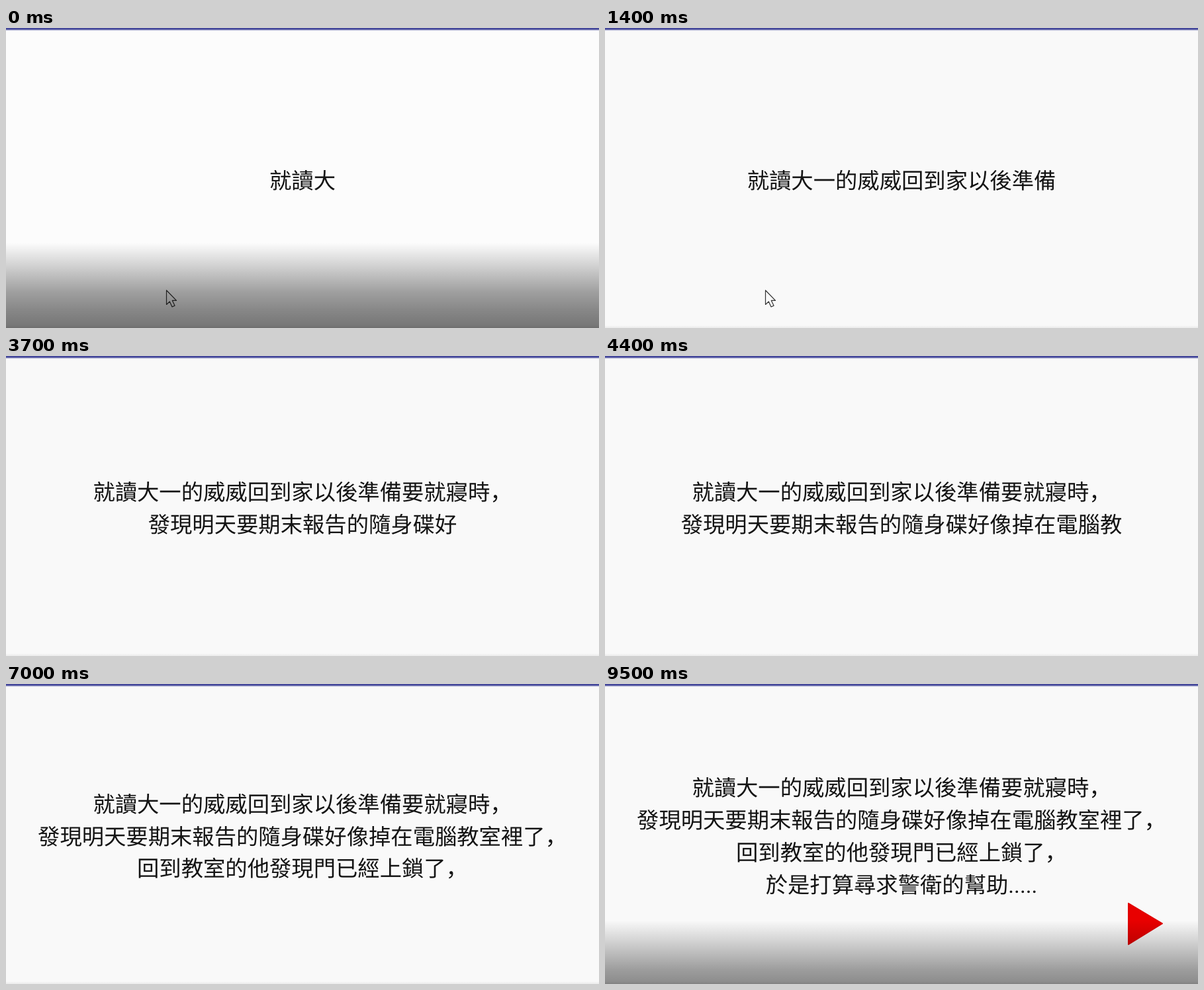
These frames come from a looping animation (896x454 px, 9600 ms). An HTML page:

```html
<!DOCTYPE html>
<html lang="zh-Hans">
<head>
<meta charset="utf-8">
<title>Typed story</title>
<style>
  html, body { margin: 0; width: 100%; height: 100%; overflow: hidden; background: #f9f9f9; }
  svg { display: block; width: 896px; height: 454px; }
  text {
    font: 400 33.35px Roboto, "Noto Sans CJK SC", "Noto Sans CJK", sans-serif;
    text-rendering: geometricPrecision;
    text-anchor: middle;
    text-spacing-trim: space-all;
    fill: #141414;
  }
</style>
</head>
<body>
<svg viewBox="0 0 896 454">
  <defs>
    <linearGradient id="bar" x2="0" y2="1">
      <stop offset="0" stop-color="#44479a"/>
      <stop offset=".4" stop-color="#44479a"/>
      <stop offset=".65" stop-color="#b9bbd8"/>
      <stop offset="1" stop-color="#f4f4f8" stop-opacity="0"/>
    </linearGradient>
    <linearGradient id="edge" x2="0" y2="1">
      <stop offset="0" stop-opacity="0"/>
      <stop offset="1" stop-opacity=".06"/>
    </linearGradient>
    <linearGradient id="dim" x2="0" y2="1">
      <stop offset="0" stop-opacity="0"/>
      <stop offset=".27" stop-opacity=".17"/>
      <stop offset=".58" stop-opacity=".37"/>
      <stop offset=".78" stop-opacity=".46"/>
      <stop offset="1" stop-opacity=".54"/>
    </linearGradient>
  </defs>
  <rect id="paper" width="896" height="454" fill="#f9f9f9"/>
  <rect width="896" height="5" fill="url(#bar)"/>
  <rect y="450" width="896" height="4" fill="url(#edge)"/>
  <g id="lines"></g>
  <path id="next" d="M791 332 842 362.5 791 394Z" fill="#e80000" stroke="#e00000" stroke-width="2" stroke-linejoin="round"/>
  <path id="pointer" d="M242.500 397v21.500l4.800-4.500 3.700 8 4-1.900-3.700-7.700h6.200Z" fill="#fafafa" stroke="#333" stroke-width="1.200" stroke-linejoin="round"/>
  <rect id="shade" y="325" width="896" height="129" fill="url(#dim)"/>
</svg>
<script>
  const LOOP = 9600, STEP = 100, PITCH = 48.8, MID = 242.6, SHADE_H = 129;
  const STORY = [
    '就讀大一的威威回到家以後準備要就寢時,',
    '發現明天要期末報告的隨身碟好像掉在電腦教室裡了,',
    '回到教室的他發現門已經上鎖了,',
    '於是打算尋求警衛的幫助.....'
  ].join('\n').replace(/,/g, '\uff0c');

  // where the typing tempo changes: [ms, characters typed]
  const TEMPO = [
    [0, 3], [1000, 10], [1400, 14], [1700, 18], [2000, 20], [2700, 27], [3000, 28],
    [4400, 40], [5800, 50], [6300, 55], [7000, 60], [8300, 71], [9100, STORY.length]
  ];

  const $ = id => document.getElementById(id);
  const show = (id, on) => $(id).setAttribute('visibility', on ? 'visible' : 'hidden');
  const rows = STORY.split('\n').map(() => {
    const row = document.createElementNS('http://www.w3.org/2000/svg', 'text');
    row.setAttribute('x', 448);
    return $('lines').appendChild(row);
  });

  function typedAt(t) {
    const i = TEMPO.findIndex(([ms]) => ms > t);
    if (i < 0) return STORY.length;
    const [t0, n0] = TEMPO[i - 1], [t1, n1] = TEMPO[i];
    return Math.round(n0 + (n1 - n0) * (t - t0) / (t1 - t0));
  }

  function drawText(t) {
    const parts = STORY.slice(0, typedAt(t)).split('\n');
    rows.forEach((row, i) => {
      row.textContent = parts[i] || '';
      row.setAttribute('y', MID + (i - (parts.length - 1) / 2) * PITCH);
    });
  }

  // how far the dark strip has slid below its resting place
  function shadeDrop(t) {
    const drop = t < LOOP / 2 ? SHADE_H * t / 1000 : 0.325 * (LOOP - t);
    return Math.min(SHADE_H, drop);
  }

  function draw(now) {
    const t = Math.floor((now % LOOP) / STEP) * STEP;
    drawText(t);
    $('shade').setAttribute('transform', `translate(0 ${shadeDrop(t)})`);
    const tone = Math.round(252 - 3 * Math.min(1, t / 1000));
    $('paper').setAttribute('fill', `rgb(${tone},${tone},${tone})`);
    show('pointer', t < 1600);
    show('next', t >= 9200);
  }

  const start = performance.now();
  function loop() {
    draw(performance.now() - start);
    requestAnimationFrame(loop);
  }
  loop();
</script>
</body>
</html>
```
